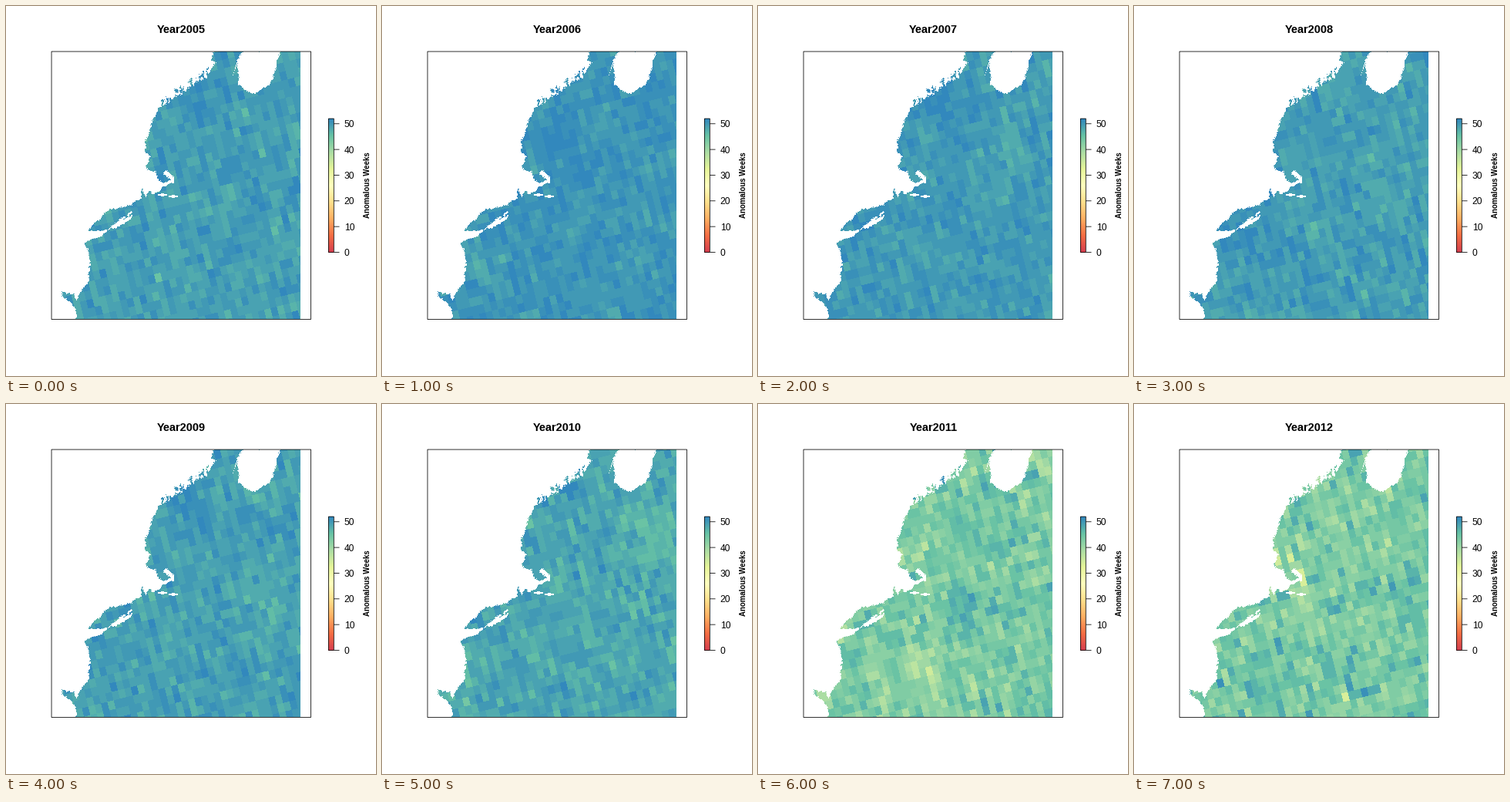
These frames come from a looping animation (480x480 px, 8000 ms). A matplotlib script:

```python
import numpy as np
import matplotlib.pyplot as plt
from matplotlib.animation import FuncAnimation
from matplotlib.colors import LinearSegmentedColormap
from matplotlib.patches import Rectangle
from matplotlib.path import Path

plt.rcParams["font.family"] = "Liberation Sans"

SIZE, DPI = 480, 80
LEFT, RIGHT, TOP, BOTTOM = 59, 382, 59, 406
TILT = np.radians(14)
CELL_W, CELL_H = 8.5, 11.3
MAX_WEEKS = 52
FIRST_YEAR = 2005

CMAP = LinearSegmentedColormap.from_list("weeks", [
    "#3288bd", "#66c2a5", "#abdda4", "#e6f598", "#ffffbf",
    "#fee08b", "#fdae61", "#f46d43", "#d53e4f"], N=512)

# Key points of the shoreline, north to south.
NORTH = [(272, 59), (267, 64), (266, 82)]
BAY = [(196, 137), (188, 152), (180, 187), (187, 195), (180, 207), (194, 214)]
CAPE = [(198, 227), (207, 229), (214, 226), (205, 215), (207, 213),
        (217, 221), (218, 230), (203, 235), (189, 244), (187, 239),
        (182, 248), (175, 236), (176, 249)]
SOUND = [(163, 258), (127, 270), (106, 291), (113, 292), (147, 277),
         (164, 266), (152, 277), (167, 267), (148, 285), (124, 299),
         (101, 308)]
SOUTH = [(107, 317), (108, 340), (99, 368), (91, 384), (89, 374), (73, 370),
         (74, 379), (85, 386), (91, 396), (91, 407)]
PENINSULA = [(309, 58), (301, 84), (301, 102), (308, 108), (323, 115),
             (341, 103), (347, 88), (354, 66), (356, 58)]
NECK = [(306, 62), (299, 74), (294, 91), (300, 75)]


def fractal(points, rough, rng, depth=3):
    """Split each edge in half and push the middle sideways, repeatedly."""
    pts = np.array(points, float)
    for _ in range(depth):
        step = np.diff(pts, axis=0)
        side = np.column_stack([-step[:, 1], step[:, 0]])
        mid = pts[:-1] + step / 2 + side * rng.normal(0, rough, (len(step), 1))
        pts = np.insert(pts, np.arange(1, len(pts)), mid, axis=0)
    return pts


def inlets(start, end, count, rng):
    """Narrow inlets cut upwards into the shore between two points."""
    pts = []
    for x, y in np.linspace(start, end, count):
        reach = rng.uniform(3, 13)
        pts += [(x + 1.5, y), (x + rng.normal(0, 1), y - reach), (x - 1, y)]
    return pts


def ocean_mask(x, y):
    rng = np.random.default_rng(4)
    ragged = NORTH + inlets((262, 90), (203, 130), 12, rng) + BAY
    coast = np.vstack([fractal(ragged, 0.17, rng),
                       fractal(CAPE + SOUND + SOUTH, 0.09, rng)])
    frame = [(91, 420), (400, 420), (400, 40), (272, 40)]
    exact = np.column_stack([x.ravel(), y.ravel()])
    pts = exact + rng.normal(0, 0.5, exact.shape)
    sea = Path(np.vstack([coast, frame])).contains_points(pts)
    sea &= ~Path(fractal(PENINSULA, 0.08, rng)).contains_points(pts)
    sea &= ~Path(NECK).contains_points(exact)
    for cx, cy in [(203, 245), (217, 247)]:
        sea &= ~(np.hypot((x - cx) / 6, (y - cy) / 1.6) < 1).ravel()
    return sea.reshape(x.shape)


def to_grid(x, y):
    c, s = np.cos(TILT), np.sin(TILT)
    return x * c - y * s, x * s + y * c


X, Y = np.meshgrid(np.arange(LEFT, RIGHT) + 0.5, np.arange(TOP, BOTTOM) + 0.5)
SEA = ocean_mask(X, Y)
U, V = to_grid(X, Y)
COL = np.floor(U / CELL_W).astype(int)
ROW = np.floor(V / CELL_H).astype(int)
COL0, ROW0 = COL.min(), ROW.min()
COL, ROW = COL - COL0, ROW - ROW0
CELL_U, CELL_V = np.meshgrid((np.arange(COL.max() + 1) + COL0 + 0.5) * CELL_W,
                             (np.arange(ROW.max() + 1) + ROW0 + 0.5) * CELL_H)

# Per year: mean weeks, centre of the warm area, centre of the cool area.
YEARS = [
    (2.5, (225, 345), (250, 110)),
    (1.6, (130, 330), (230, 170)),
    (2.0, (320, 180), (230, 130)),
    (2.4, (335, 220), (150, 290)),
    (2.7, (330, 250), (240, 130)),
    (3.5, (345, 165), (235, 115)),
    (8.6, (215, 350), (275, 260)),
    (8.6, (205, 215), (175, 360)),
]


def patch(center):
    u, v = to_grid(*center)
    return np.exp(-((CELL_U - u) / 28) ** 2 - ((CELL_V - v) / 42) ** 2)


def year_map(year, mean, warm, cool):
    rng = np.random.default_rng(year)
    noise = rng.normal(size=CELL_U.shape)
    noise += 0.3 * np.roll(noise, 1, 0)
    spread = 0.65 + 0.18 * mean
    weeks = mean + spread * (noise + 1.5 * patch(warm) - 1.5 * patch(cool))
    weeks = np.clip(np.round(weeks), 0, MAX_WEEKS)
    rgb = CMAP(weeks[ROW, COL] / MAX_WEEKS)[..., :3]
    rgb[~SEA] = 1
    return rgb


MAPS = [year_map(FIRST_YEAR + i, *spec) for i, spec in enumerate(YEARS)]

fig = plt.figure(figsize=(SIZE / DPI, SIZE / DPI), dpi=DPI, facecolor="white")
ax = fig.add_axes([0, 0, 1, 1])
ax.axis("off")


def px(n):
    return n * 72 / DPI


def box(x0, y0, x1, y1):
    ax.add_patch(Rectangle((x0, y0), x1 - x0, y1 - y0, fill=False, ec="black",
                           lw=px(0.8), snap=False, zorder=3))


def label(x, y, text, size, **kw):
    return ax.text(x, y, text, fontsize=px(size), color="black", **kw)


sea_map = ax.imshow(MAPS[0], extent=(LEFT, RIGHT, BOTTOM, TOP),
                    interpolation="nearest", zorder=1)
box(59.04, 59.04, 395.5, 406.5)

# Colour scale
BAR_L, BAR_R, BAR_T, BAR_B = 418.5, 425.3, 146.1, 319.5
ax.imshow(np.linspace(1, 0, 174)[:, None], cmap=CMAP, vmin=0, vmax=1,
          extent=(418, 425, 146, 320), interpolation="nearest", zorder=1)
box(BAR_L, BAR_T, BAR_R, BAR_B)
for weeks in range(0, 51, 10):
    y = BAR_B - weeks * (BAR_B - BAR_T) / MAX_WEEKS
    ax.plot([BAR_R, 432.5], [y, y], color="black", lw=px(0.8), snap=False,
            solid_capstyle="butt", zorder=3)
    label(438.8, y + 4.6, str(weeks), 12, va="baseline")
label(469.2, 232.5, "Anomalous Weeks", 9.6, weight="bold", rotation=90,
      ha="center", va="center")

title = label(227.7, 35, "", 14.5, weight="bold", ha="center", va="baseline")

ax.set_aspect("auto")
ax.set_xlim(0, SIZE)
ax.set_ylim(SIZE, 0)


def draw(i):
    sea_map.set_data(MAPS[i])
    title.set_text(f"Year{FIRST_YEAR + i}")
    return sea_map, title


anim = FuncAnimation(fig, draw, frames=len(YEARS), interval=1000,
                     repeat=True, repeat_delay=0)
plt.show()
```
